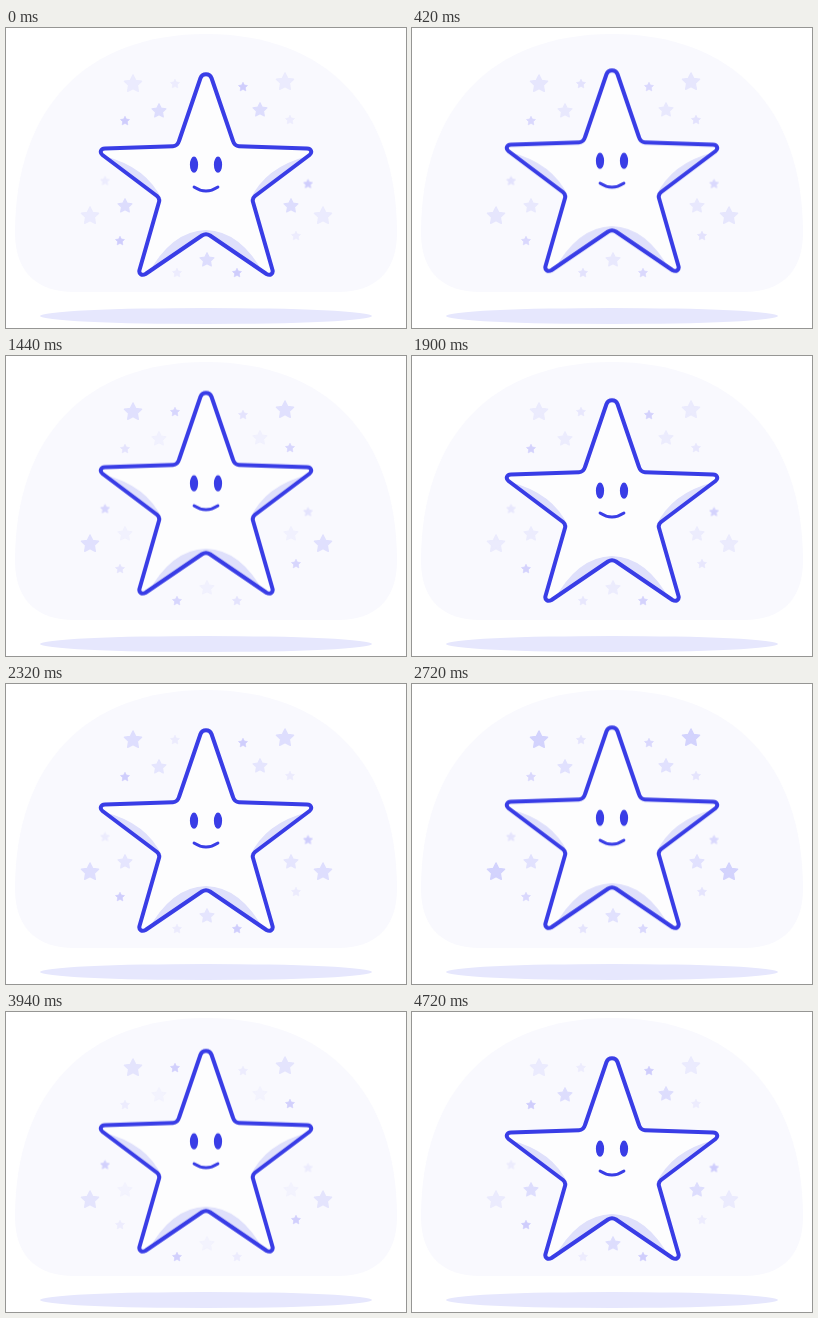
An HTML page for the animation above (4.74 s loop, 400 by 300 pixels).

```html
<!DOCTYPE html>
<html lang="en">
<head>
<meta charset="utf-8">
<title>Happy star</title>
<style>
html, body { margin: 0; width: 100%; height: 100%; overflow: hidden; background: #fff; }
svg { display: block; width: 100%; height: 100%; }

#hero { animation: bob 2370ms infinite; }
.big, .mid, .odd, .even { animation: 4740ms linear infinite; }
.big { fill: stroke; color: #cecefd; animation-name: big; }
.mid { color: #d2d2fd; animation-name: mid; }
.odd { color: #c8c6fc; animation-name: odd; }
.even { color: #c8c6fc; animation-name: even; }
.big, .mid, .odd, .even { fill: currentColor; stroke: currentColor; stroke-width: .16; stroke-linejoin: round; }

@keyframes bob {
  0% { transform: translateY(0); animation-timing-function: cubic-bezier(.364, 0, .636, 1); }
  46.4% { transform: translateY(-12px); animation-timing-function: cubic-bezier(.364, 0, .636, 1); }
  92.8%, 100% { transform: translateY(0); }
}
@keyframes big {
  0% { opacity: .33; } 6% { opacity: .36; } 16.9% { opacity: .7; } 21% { opacity: .8; }
  40% { opacity: .33; } 57.4% { opacity: .9; } 62% { opacity: .95; } 65.8% { opacity: .9; }
  83.1% { opacity: .48; } 95%, 100% { opacity: .33; }
}
@keyframes mid {
  0% { opacity: .72; } 16.9% { opacity: .15; } 23% { opacity: .1; } 40% { opacity: .34; }
  55% { opacity: .64; } 57.4% { opacity: .62; } 65.8% { opacity: .48; }
  83.1% { opacity: .14; } 100% { opacity: .72; }
}
@keyframes odd {
  0% { opacity: .25; } 5% { opacity: .28; } 16.9% { opacity: .8; } 23% { opacity: .95; }
  40% { opacity: .35; } 50% { opacity: .25; } 57.4% { opacity: .4; } 65.8% { opacity: .78; }
  75% { opacity: .95; } 83.1% { opacity: .8; } 97%, 100% { opacity: .25; }
}
@keyframes even {
  0% { opacity: .85; } 5% { opacity: .82; } 16.9% { opacity: .27; } 23% { opacity: .15; }
  40% { opacity: .76; } 50% { opacity: .85; } 57.4% { opacity: .64; } 65.8% { opacity: .4; }
  75% { opacity: .15; } 83.1% { opacity: .24; } 97%, 100% { opacity: .85; }
}
</style>
</head>
<body>
<svg viewBox="0 0 400 300">
  <defs>
    <path id="s" d="M0-1 .29-.4 .95-.31 .48.15 .59.81 0 .5-.59.81-.48.15-.95-.31-.29-.4Z"/>
    <path id="body" d="M194.5 50C196.5 45 203.5 45 205.5 50L227 113Q228.5 118 233 118.200L301 120.500C305.500 120.700 306.500 124.500 303.500 127L249 168Q246 170.500 247 174L266.500 242C267.500 246 264 248 260.500 246L204 207.500Q200 205 196 207.500L139.500 246C136 248 132.500 246 133.500 242L153 174Q154 170.500 151 168L96.500 127C93.500 124.500 94.500 120.700 99 120.500L167 118.200Q171.500 118 173 113Z"/>
    <clipPath id="clip"><use href="#body"/></clipPath>
  </defs>

  <path fill="#f9f9fe" d="M200 6C80 6 9 80 9 205C9 243 30 264 68 264H332C370 264 391 243 391 205C391 80 320 6 200 6Z"/>
  <ellipse cx="200" cy="288" rx="166" ry="8" fill="#e6e7fd"/>

  <g id="sky"></g>

  <g id="hero">
    <use href="#body" fill="#fdfdfe"/>
    <g clip-path="url(#clip)" fill="#dfe0fb">
      <path d="M98 128Q141 139 156 172L148 176Z"/>
      <path d="M302 128Q259 139 244 172L252 176Z"/>
      <path d="M140 250Q164 203 200 202Q236 203 260 250Z"/>
    </g>
    <use href="#body" fill="none" stroke="#393de6" stroke-width="4" stroke-linejoin="round"/>
    <g fill="#393de6">
      <ellipse cx="188" cy="136.700" rx="4.100" ry="8.100"/>
      <ellipse cx="212" cy="136.700" rx="4.100" ry="8.100"/>
    </g>
    <path d="M188 159Q200 167 212 159" fill="none" stroke="#393de6" stroke-width="2.800" stroke-linecap="round"/>
  </g>
</svg>
<script>
const groups = {
  big: { r: 9, at: [[127, 56], [279, 54], [84, 188], [317, 188]] },
  mid: { r: 7.3, at: [[153, 83], [254, 82], [119, 178], [285, 178], [201, 232]] },
  odd: { r: 4.7, at: [[169, 56], [284, 92], [99, 153], [290, 208], [171, 245]] },
  even: { r: 4.7, at: [[237, 59], [119, 93], [302, 156], [114, 213], [231, 245]] }
};
document.getElementById('sky').innerHTML = Object.entries(groups).map(([name, { r, at }]) =>
  `<g class="${name}">` +
  at.map(([x, y]) => `<use href="#s" transform="translate(${x} ${y}) scale(${r})"/>`).join('') +
  '</g>').join('');
</script>
</body>
</html>
```
